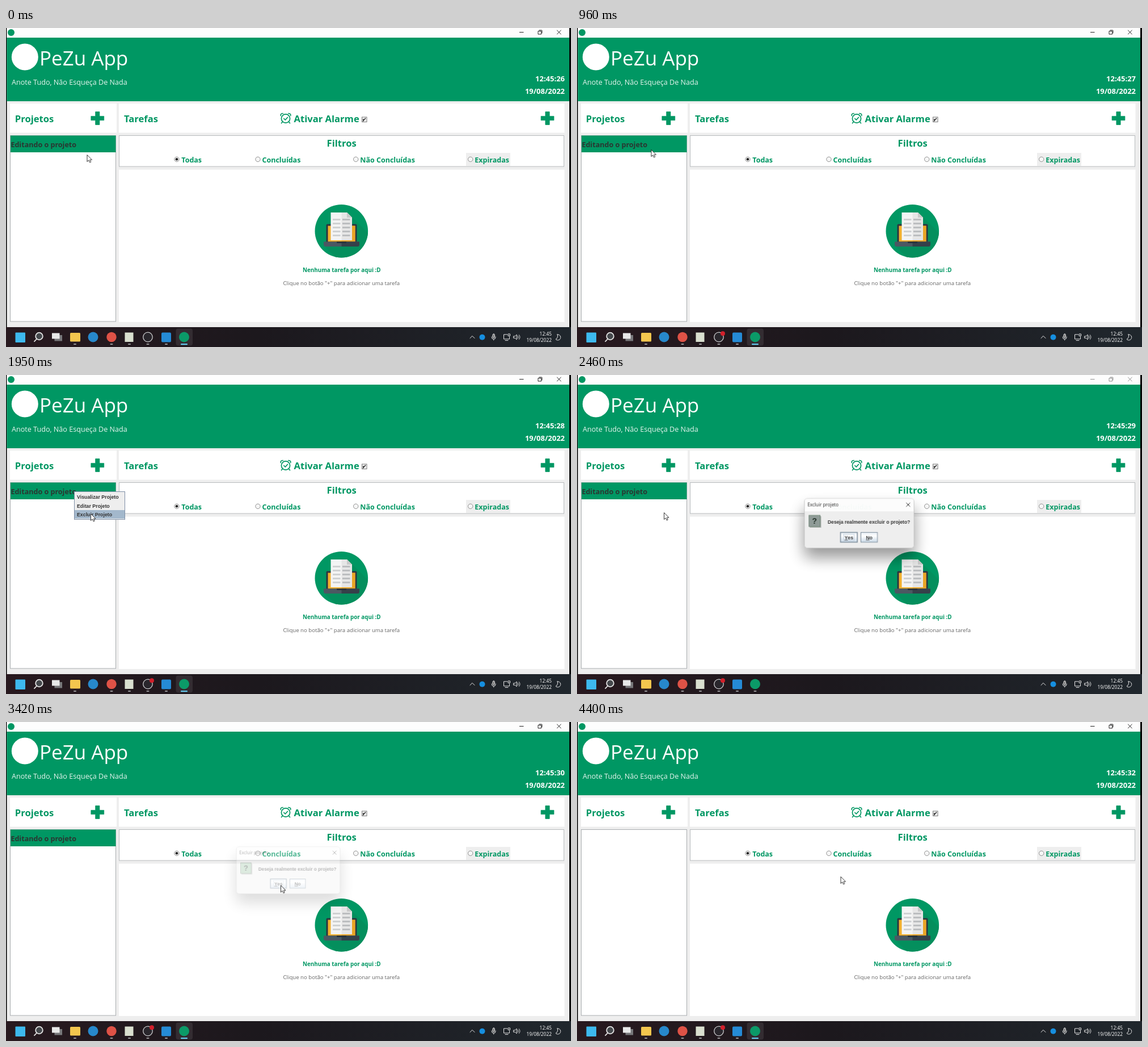
An HTML page for the animation above (4430 ms loop, 996 by 562 pixels).

```html
<!DOCTYPE html>
<html lang="pt-BR">
<head>
<meta charset="utf-8">
<title>Lista de tarefas</title>
<style>
html, body { margin: 0; width: 100%; height: 100%; overflow: hidden; background: #000; }
svg { display: block; }
text { font-family: "Open Sans", "Noto Sans", sans-serif; white-space: pre; }
.b { font-weight: 700; fill: #009763; }
.h { font-size: 16.6px; }
.f { font-size: 12.5px; }
.w { fill: #fff; }
.time { font-size: 13px; font-weight: 700; fill: #fff; text-anchor: end; }
.mid { text-anchor: middle; }
.metal text { font: 700 8.8px "Liberation Sans", Arial, sans-serif; fill: #333; }
.line { fill: none; stroke: #222; stroke-width: 1; }
.tray { fill: none; stroke: #e8e8e8; stroke-width: 1; stroke-linecap: round; stroke-linejoin: round; }

/* One shared loop; step-end marks the hard changes */
.a { animation: 4430ms step-end infinite; }
.smooth { animation-timing-function: linear; }
.clock { animation-name: clock; }
.rec { animation-name: rec; }
.menu { animation-name: menu; }
.hover { animation-name: hover; }
.focus { animation-name: focus; }
.row { animation-name: row; }
.dialog { animation-name: dialog; transform-origin: 497.5px 261px; }
.mark { animation-name: mark; }
.cursor { animation-name: cursor; }

@keyframes clock {
  0% { transform: translateY(0); }
  19.86% { transform: translateY(-20px); }
  35.44% { transform: translateY(-40px); }
  51.47% { transform: translateY(-60px); }
  66.59% { transform: translateY(-80px); }
  82.17% { transform: translateY(-100px); }
  97.97%, 100% { transform: translateY(-120px); }
}
@keyframes rec { 0% { opacity: 0; } 1.35%, 100% { opacity: 1; } }
@keyframes menu {
  0% { opacity: 0; }
  29.35% { opacity: 1; }
  51.47%, 100% { opacity: 0; }
}
@keyframes hover {
  0% { opacity: 0; transform: translateY(0); }
  31.2% { opacity: 1; transform: translateY(0); }
  35.6% { opacity: 1; transform: translateY(15.5px); }
  40.2%, 100% { opacity: 1; transform: translateY(31px); }
}
@keyframes focus {
  0% { opacity: 1; }
  52.5% { opacity: var(--off, 0); }
  77%, 100% { opacity: 1; }
}
@keyframes row { 0% { opacity: 1; } 78.3%, 100% { opacity: 0; } }
@keyframes dialog {
  0%, 52.8% { opacity: 0; transform: scale(.9); }
  55.5% { opacity: .98; transform: scale(.985); }
  57.5%, 75.85% { opacity: 1; transform: scale(1); }
  77.9%, 100% { opacity: 0; transform: scale(.9); }
}
@keyframes mark { 0% { fill: #8d9995; } 57.5%, 100% { fill: #99c2a2; } }
@keyframes cursor {
  0%, 13.54% { transform: translate(142.5px, 223px); }
  21.67% { transform: translate(130.5px, 214px); }
  25.06%, 30.5% { transform: translate(120px, 205px); }
  42%, 51.47% { transform: translate(149px, 244px); }
  54.2%, 56.2% { transform: translate(153px, 242px); }
  64.3% { transform: translate(503px, 274px); }
  67.04%, 67.8% { transform: translate(509px, 277px); }
  71.5%, 77% { transform: translate(484px, 287px); }
  79%, 88.04% { transform: translate(484px, 290.5px); }
  97.07%, 100% { transform: translate(464.5px, 272px); }
}
</style>
</head>
<body>
<svg width="996" height="562" viewBox="0 0 996 562">
  <defs>
    <linearGradient id="bar">
      <stop offset="0" stop-color="#28191f"/><stop offset=".45" stop-color="#1c181d"/><stop offset="1" stop-color="#20272d"/>
    </linearGradient>
    <linearGradient id="btn" x2="0" y2="1">
      <stop offset="0" stop-color="#e6edf4"/><stop offset=".35" stop-color="#fff"/><stop offset="1" stop-color="#cbdae8"/>
    </linearGradient>
    <filter id="shade" x="-40%" y="-50%" width="180%" height="260%">
      <feDropShadow dx="0" dy="17" stdDeviation="14" flood-opacity=".42"/>
    </filter>
    <clipPath id="disc"><circle cx="591.3" cy="357.8" r="46.8"/></clipPath>
    <path id="plus" d="M-3.6-11.4H3.6V-3.6H11.4V3.6H3.6V11.4H-3.6V3.6H-11.4V-3.6H-3.6Z"
      fill="#009763" stroke="#009763" stroke-width=".8" stroke-linejoin="round"/>
    <circle id="radio" r="4.2" fill="#f6f6f6" stroke="#858585" stroke-width=".9"/>
    <rect id="dot" x="-2.5" y="556" width="5" height="2" rx="1" fill="#9a989b"/>
  </defs>

  <!-- Window -->
  <rect width="996" height="562" fill="#000"/>
  <rect x="1.5" width="991.5" height="527" fill="#eee"/>
  <rect x="1.5" width="991.5" height="17" fill="#fdfdfd"/>
  <circle cx="9" cy="8" r="6" fill="#009763"/>
  <g class="a focus" style="--off:.5">
    <path class="line" d="M905 7.5h7.5M938 5.5h5.5v5.500h-5.5zM939.5 3.9h4.5q1 0 1 1v4.5M971.2 3.8l7.3 7.3M978.5 3.8l-7.3 7.3"/>
  </g>
  <rect x="1.5" y="17" width="991.5" height="112" fill="#009763"/>
  <circle cx="33.3" cy="51" r="23.5" class="w"/>
  <text x="59" y="66" class="w" font-size="35">PeZu App</text>
  <text x="10" y="100" fill="#e6f5ef" font-size="12.6">Anote Tudo, Não Esqueça De Nada</text>
  <svg x="900" y="80" width="90" height="18">
    <g class="a clock">
      <text class="time" x="85" y="13.5">12:45:26</text>
      <text class="time" x="85" y="33.5">12:45:27</text>
      <text class="time" x="85" y="53.5">12:45:28</text>
      <text class="time" x="85" y="73.5">12:45:29</text>
      <text class="time" x="85" y="93.5">12:45:30</text>
      <text class="time" x="85" y="113.5">12:45:31</text>
      <text class="time" x="85" y="133.5">12:45:32</text>
    </g>
  </svg>
  <text class="time" x="985" y="116">19/08/2022</text>

  <!-- Section headings -->
  <path class="w" d="M7 133h188v51.5H7zM199 133h785.5v51.5H199zM199 249.5h785.5v268.5H199z"/>
  <text x="15.8" y="166" class="b h">Projetos</text>
  <text x="208" y="166" class="b h">Tarefas</text>
  <use href="#plus" x="161.3" y="159"/>
  <use href="#plus" x="954.5" y="159"/>
  <g fill="none" stroke="#009763" stroke-width="1.7" stroke-linecap="round" stroke-linejoin="round">
    <circle cx="493" cy="159.5" r="7.6"/>
    <path d="M484.3 154.5q-.8-4 4-4M501.7 154.5q.8-4-4-4M487.3 165.5l-1.8 2.2M498.7 165.5l1.8 2.2M489.8 159.5l2.5 2.5 4.2-4.7"/>
  </g>
  <text x="507.5" y="166" class="b h">Ativar Alarme</text>
  <rect x="627.5" y="157" width="8.5" height="8.5" fill="#f4f4f4" stroke="#777"/>
  <path d="M629.7 160v3.5l4.3-4.8" fill="none" stroke="#222" stroke-width="1.3"/>

  <!-- Project list -->
  <rect x="7.5" y="189.5" width="186" height="327.5" fill="#fff" stroke="#a9adb0"/>
  <g class="a row">
    <rect x="8" y="189.5" width="185.5" height="29.5" fill="#009763"/>
    <text x="8.4" y="210" class="b" font-size="12.55" style="fill:#2b3531">Editando o projeto</text>
  </g>

  <!-- Filters -->
  <rect x="199.5" y="189.5" width="784" height="54.5" fill="#fff" stroke="#b8bbbd"/>
  <rect x="811" y="220" width="78" height="23" fill="#eee"/>
  <text x="591.7" y="209" class="b h mid">Filtros</text>
  <use href="#radio" x="301" y="231.3"/>
  <circle cx="301" cy="231.3" r="2.3" fill="#222"/>
  <use href="#radio" x="444" y="231.3"/>
  <use href="#radio" x="616.7" y="231.3"/>
  <use href="#radio" x="818.7" y="231.3"/>
  <text x="309.3" y="237" class="b f">Todas</text>
  <text x="451.5" y="237" class="b f">Concluídas</text>
  <text x="624.3" y="237" class="b f">Não Concluídas</text>
  <text x="826.3" y="237" class="b f">Expiradas</text>

  <!-- Empty state -->
  <circle cx="591.3" cy="357.8" r="46.8" fill="#009763"/>
  <path clip-path="url(#disc)" d="M602 325l60 60v60h-40l-60-60z" fill="#048f5d"/>
  <rect x="564.5" y="345.5" width="54" height="33" rx="2" fill="#2c3640"/>
  <rect x="567.5" y="348.5" width="48" height="28" fill="#f2b02e"/>
  <path d="M591.5 348.5h24v28h-24z" fill="#e9a526"/>
  <path d="M572.5 325h28.5l9 9v40h-37.5z" fill="#f4f4f4"/>
  <path d="M591.5 325h9.5l9 9v40h-18.5z" fill="#e6e6e6"/>
  <path d="M601 325l9 9h-9z" fill="#c9c9c9"/>
  <g fill="none" stroke-width="3">
    <path d="M576 337.5h13.500M576 344.500h13.5M576 351.5h13.5M576 358.5h13.5M576 365.5h13.5" stroke="#d0d2d3"/>
    <path d="M593 337.5h13.5M593 344.5h13.5M593 351.5h13.5M593 358.5h13.5M593 365.5h13.5" stroke="#bcbec0"/>
  </g>
  <path d="M560 376.5h63v5q0 3.5-3.5 3.5h-56q-3.5 0-3.5-3.5z" fill="#4b5862"/>
  <path d="M591.5 376.5h31.5v5q0 3.5-3.5 3.5h-28z" fill="#35404a"/>
  <path d="M583 376.5h17v1.2q0 1.3-1.3 1.3h-14.4q-1.3 0-1.3-1.3z" fill="#26303a"/>
  <text x="591.8" y="430" class="b mid" font-size="9.85">Nenhuma tarefa por aqui :D</text>
  <text x="591.3" y="453" class="mid" font-size="9.65" fill="#666">Clique no botão "+" para adicionar uma tarefa</text>

  <!-- Taskbar -->
  <rect y="527" width="996" height="35" fill="url(#bar)"/>
  <g class="a focus">
    <rect x="299.5" y="529.5" width="29.5" height="30" rx="4" fill="#fff" fill-opacity=".09"/>
  </g>
  <rect x="16.5" y="536.5" width="17.5" height="17.5" rx="1" fill="#3db9ee"/>
  <g fill="none" stroke="#e4e4e4" stroke-width="1.8" stroke-linecap="round">
    <circle cx="58.5" cy="543" r="6.3" fill="#45484c"/><path d="M54 548l-4 4.2"/>
  </g>
  <rect x="85.5" y="541" width="13.5" height="10.5" fill="#77777a"/>
  <rect x="81" y="537.5" width="13.5" height="10" fill="#e8e8e8"/>
  <rect x="113" y="537" width="18" height="15.5" rx="1.5" fill="#f3c64e"/>
  <circle cx="153.5" cy="544.5" r="9" fill="#2788cb"/>
  <circle cx="186" cy="544.5" r="8.7" fill="#de5246"/>
  <rect x="209.5" y="536.5" width="15" height="16.5" fill="#d9dfcf"/>
  <circle cx="250" cy="544.5" r="8.3" fill="#29262c" stroke="#c9c9cb" stroke-width="1.3"/>
  <circle class="a rec" cx="257" cy="538.3" r="4" fill="#d3202b"/>
  <rect x="274" y="536.5" width="17" height="17" rx="2" fill="#258bd6"/>
  <circle cx="314" cy="544.5" r="9" fill="#0b9a68"/>
  <use href="#dot" x="121.5"/><use href="#dot" x="186"/><use href="#dot" x="217.5"/>
  <use href="#dot" x="250"/><use href="#dot" x="282.5"/><use href="#dot" x="314"/>
  <g class="a focus"><rect x="308" y="556" width="12" height="2.2" rx="1" fill="#63c9ee"/></g>
  <circle cx="839.5" cy="544.8" r="5" fill="#168fe0"/>
  <g class="tray">
    <path d="M818 546.5l4-4 4 4M856.300 544v.8a3.400 3.400 0 0 0 6.800 0V544M859.7 548.5v1.5"/>
    <rect x="858" y="539" width="3.4" height="7" rx="1.7" fill="#777"/>
    <path d="M883.5 540h-6v8h10v-4M880 550.5h5M885.5 539h3v3.5h-3zM895 543h2.3l3-2.7v8.6l-3-2.7H895zM902.5 542.5q1.7 2.1 0 4.2M904.5 540.8q3 3.8 0 7.6"/>
    <path d="M972 540a5 5 0 1 1-3 8.3 6 6 0 0 0 3-8.3z"/>
  </g>
  <g fill="#fff" font-size="8.4" text-anchor="end">
    <text x="962" y="541.5">12:45</text>
    <text x="962" y="553">19/08/2022</text>
  </g>

  <!-- Context menu -->
  <g class="a menu metal">
    <rect x="120.5" y="205.5" width="89" height="49" fill="#eee" stroke="#7e8fa6"/>
    <rect class="a hover" x="121" y="207" width="88" height="15" fill="#a3b8cc"/>
    <text x="125" y="218">Visualizar Projeto</text>
    <text x="125" y="233.5">Editar Projeto</text>
    <text x="125" y="249">Excluir Projeto</text>
  </g>

  <!-- Confirmation -->
  <g class="a smooth dialog metal">
    <rect x="399.5" y="217" width="196" height="88.5" rx="5" fill="#eee" stroke="#b5b5b5" stroke-width=".7" filter="url(#shade)"/>
    <path d="M400 240v-18q0-4.7 4.7-4.7h185.6q4.7 0 4.7 4.7v18z" fill="#fcfcfc"/>
    <text x="405" y="231.5" style="font:8.3px 'Open Sans',sans-serif;fill:#222">Excluir projeto</text>
    <path class="line" d="M581.5 224.5l7 7M588.5 224.5l-7 7"/>
    <rect x="409" y="248.5" width="20.5" height="20.5" fill="#a9aeac"/>
    <rect class="a mark" x="407.5" y="247" width="20" height="20" stroke="#6f8575"/>
    <text x="417.5" y="262" class="mid" style="font-size:14px;fill:#1f2d24">?</text>
    <text x="441" y="262" style="font-size:8.75px">Deseja realmente excluir o projeto?</text>
    <g fill="url(#btn)" stroke="#7a8a99">
      <rect x="464" y="277.5" width="30" height="17.5" stroke-width="1.5"/>
      <rect x="500.5" y="277.5" width="29.5" height="17.5"/>
    </g>
    <rect x="469.5" y="281" width="19" height="11" fill="none" stroke="#b3c4d5" stroke-width=".7"/>
    <text x="479" y="289.7" class="mid"><tspan text-decoration="underline">Y</tspan>es</text>
    <text x="515.3" y="289.7" class="mid"><tspan text-decoration="underline">N</tspan>o</text>
  </g>

  <path class="a smooth cursor" d="M.5.5V12.5L3.3 9.9 5.2 14 7.2 13.1 5.4 9.2H9Z" fill="#fff" stroke="#222" stroke-width=".9" stroke-linejoin="round"/>
</svg>
</body>
</html>
```
